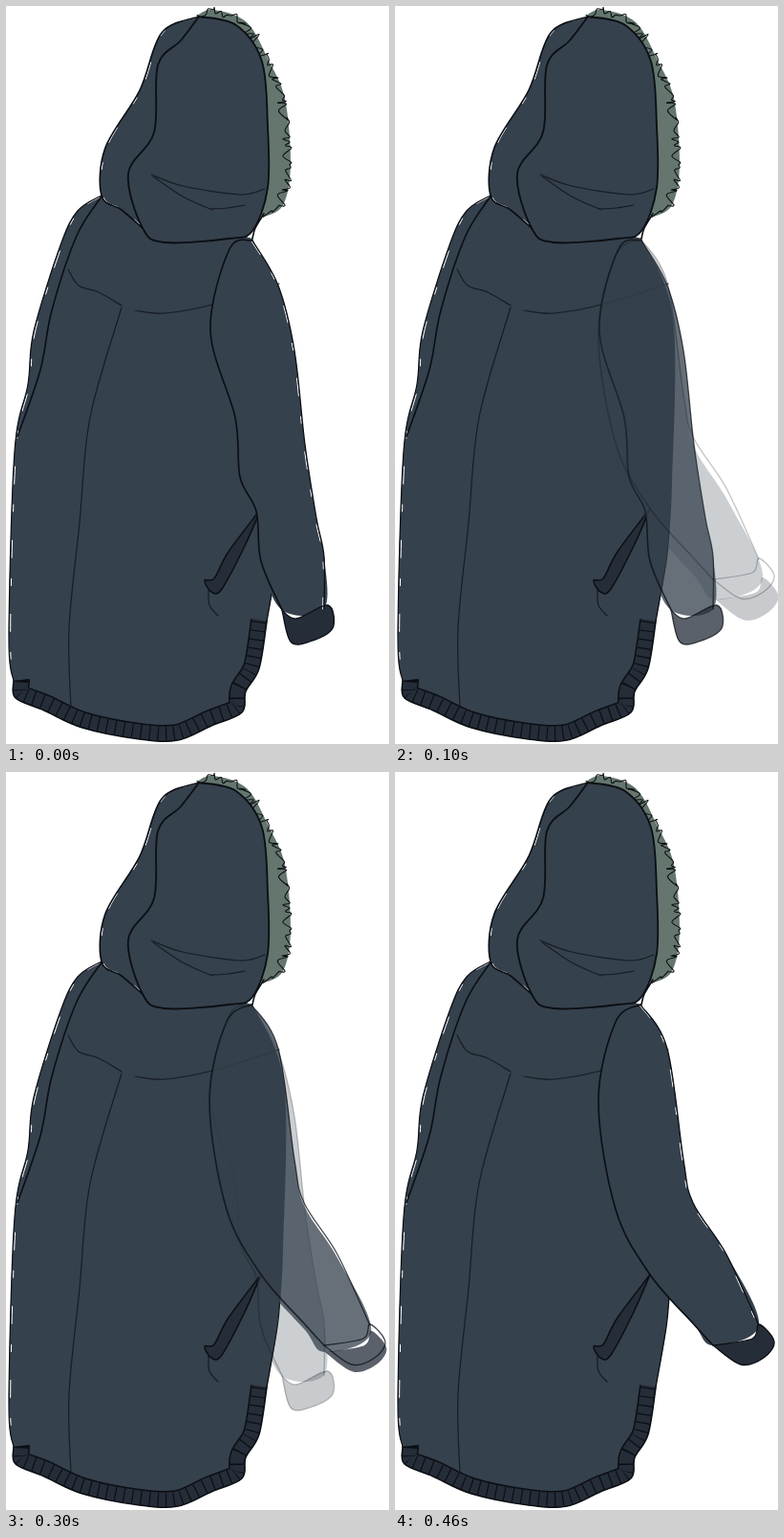
An HTML page with a canvas for the animation above (0.5 s loop, 401 by 771 pixels).

```html
<!DOCTYPE html>
<html lang="en">
<head>
<meta charset="utf-8">
<title>Parka</title>
<style>
html, body { margin: 0; height: 100%; overflow: hidden; background: #fff; }
canvas { display: block; }
</style>
</head>
<body>
<canvas id="stage" width="401" height="771"></canvas>
<script>
const ctx = document.getElementById('stage').getContext('2d');
const CLOTH = '#35414d', DARK = '#252d38', INK = '#0b0e13', FUR = '#64766d';
const LOOP = 500, STEP = 100;

const points = text => text.split(' ').map(p => p.split(',').map(Number));

// Smooth path through a few key points (Catmull-Rom).
function smooth(p) {
  const path = new Path2D();
  path.moveTo(...p[0]);
  for (let i = 0; i < p.length - 1; i++) {
    const a = p[i - 1] || p[i], b = p[i], c = p[i + 1], d = p[i + 2] || c;
    path.bezierCurveTo(b[0] + (c[0] - a[0]) / 6, b[1] + (c[1] - a[1]) / 6,
      c[0] - (d[0] - b[0]) / 6, c[1] - (d[1] - b[1]) / 6, ...c);
  }
  return path;
}
const curve = text => smooth(points(text));

function fill(path, color) {
  ctx.fillStyle = color;
  ctx.fill(path);
}
function line(path, width = 1.6, color = INK) {
  ctx.lineWidth = width;
  ctx.strokeStyle = color;
  ctx.stroke(path);
}
// Broken white gap between cloth and contour.
function gap(path, dx) {
  ctx.save();
  ctx.translate(dx, 0);
  ctx.setLineDash([18, 22, 7, 30]);
  line(path, 1, '#fff');
  ctx.restore();
}

// Coat
const sideText = '100,198 75,214 57,250 29,340 23,395 9,465 3,660 8,705';
const bottomText = '8,705 10,723 40,736 80,754 140,766 180,767 215,752 247,738 251,716 265,692 273,643';
const edgeText = '273,643 284,580 290,500 291,325 258,243';
const body = curve([sideText, bottomText, edgeText].join(' '));
const side = curve(sideText), bottom = curve(bottomText);
const lowerEdge = curve('287,548 284,580 273,643');
const sleeveSeam = curve('100,199 74,240 48,318 36,380 12,450');
const pocket = curve('267,525 233,570 218,598 208,600 215,612 226,609 250,564 267,525');
const seams = [
  '65,275 76,292 97,299 121,313',
  '135,318 166,321 216,312 286,290',
  '121,315 88,430 77,540 66,650 68,733',
  '212,610 213,626 222,637'
].map(curve);

// Hood
const hoodBack = curve('202,11 163,28 140,88 104,148 100,198 121,213 143,232');
const hoodFace = curve('202,11 183,36 159,62 155,132 128,175 143,232 166,247 233,243 258,235 274,190 274,125 268,58 241,20 202,11');
const collar = curve('258,243 261,232 270,217');
const creases = [
  '152,176 185,188 245,197 271,191',
  '154,178 185,199 216,213',
  '214,212 232,211 250,208'
].map(curve);

// Fur with a scribbled fringe along its outer edge
const furEdge = points('200,10 217,4 252,17 275,57 292,97 298,165 290,208 268,221');
const fur = smooth(furEdge);

function scribble(edge) {
  let seed = 11;
  const rand = () => (seed = seed * 16807 % 2147483647) / 2147483647;
  const hairs = [];
  for (let i = 1; i < edge.length; i++) {
    const [x, y] = edge[i - 1], dx = edge[i][0] - x, dy = edge[i][1] - y;
    const length = Math.hypot(dx, dy);
    for (let along = 0; along < length; along += 3 + 3 * rand()) {
      const u = along / length, reach = hairs.length % 2 ? 4 * rand() : -9 * rand();
      hairs.push([x + dx * u + dy / length * reach, y + dy * u - dx / length * reach * .5 + 8 * (rand() - .5)]);
    }
  }
  return smooth(hairs);
}
const fringe = scribble(furEdge);

// Sleeves
function makeArm(leftText, rightText, cuffText) {
  const left = points(leftText), right = points(rightText);
  return {
    shape: smooth([...left, ...right.slice().reverse()]),
    left: smooth(left),
    right: smooth(right),
    cuff: curve(cuffText)
  };
}
const lowered = makeArm(
  '258,245 234,254 214,339 240,430 245,492 262,528 267,580 289,631',
  '258,245 285,292 302,360 313,458 325,535 333,575 333,630',
  '289,631 304,640 337,626 342,650 318,664 298,664 289,631');
const raised = makeArm(
  '257,243 231,261 213,344 231,457 267,525 312,576 333,599',
  '257,243 285,289 302,405 312,450 347,504 381,578',
  '333,599 374,592 381,577 397,595 386,612 362,619 333,599');

function drawArm(arm, alpha, stretch = 0) {
  ctx.save();
  ctx.globalAlpha = alpha;
  ctx.save();
  ctx.translate(250, 245);
  ctx.scale(1 + stretch / 2, 1 + stretch);
  ctx.translate(-250, -245);
  fill(arm.shape, CLOTH);
  fill(arm.cuff, DARK);
  ctx.restore();
  if (alpha === 1) gap(arm.right, -1.3);
  line(arm.left);
  line(arm.right, 1.3);
  line(arm.cuff, 1.3);
  ctx.restore();
}

// Ribbed band: wide strokes along the bottom, kept inside the coat.
function drawHem() {
  ctx.save();
  ctx.clip(body);
  ctx.lineCap = 'butt';
  line(bottom, 34);
  line(bottom, 31, DARK);
  ctx.setLineDash([1.2, 8]);
  line(bottom, 31);
  ctx.restore();
}

function drawCoat() {
  fill(body, CLOTH);
  drawHem();
  gap(side, 1.6);
  line(side, 1.2);
  line(bottom);
  line(lowerEdge, 1.3);
  line(sleeveSeam);

  fill(fur, FUR);
  line(fringe, 1.1);
  fill(hoodBack, CLOTH);
  fill(hoodFace, CLOTH);
  gap(hoodBack, 1.4);
  line(hoodBack);
  line(hoodFace, 1.8);
  line(collar);

  [...seams, ...creases].forEach(p => line(p, 1.2, '#171d25'));
  fill(pocket, DARK);
  line(pocket, 1.5);
}

function draw() {
  const mix = Math.floor(performance.now() % LOOP / STEP) / (LOOP / STEP - 1);
  ctx.fillStyle = '#fff';
  ctx.fillRect(0, 0, 401, 771);
  ctx.lineCap = ctx.lineJoin = 'round';
  drawCoat();
  if (mix < 1) drawArm(lowered, 1 - mix);
  // The raised sleeve's colour shrinks into its contour as it appears.
  if (mix > 0) drawArm(raised, mix, .08 * (1 - mix));
  requestAnimationFrame(draw);
}
draw();
</script>
</body>
</html>
```
